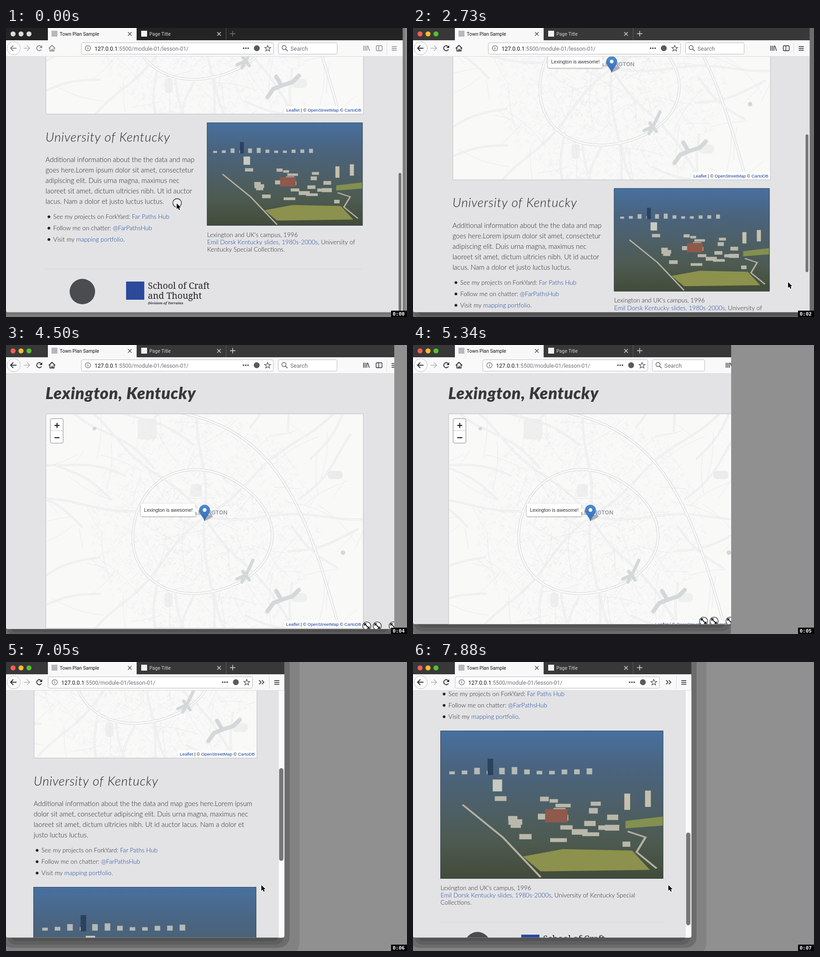
Write an HTML page with a canvas that moves like this. It is 881 by 636 pixels and loops after 8 s.

```html
<!DOCTYPE html>
<html lang="en">
<head>
<meta charset="utf-8">
<title>Responsive map page</title>
<style>
html, body { margin: 0; width: 100%; height: 100%; overflow: hidden; background: #909090; }
canvas { display: block; width: 881px; height: 636px; }
</style>
</head>
<body>
<canvas id="stage" width="881" height="636"></canvas>
<script>
const LOOP = 8000, STEPS = 56, TAU = 2 * Math.PI;
const INK = '#232326', LINK = '#17429b';
const SANS = '"Liberation Sans", Arial, sans-serif', UI = 'Roboto, sans-serif', SERIF = '"Noto Serif", serif';
const stage = document.getElementById('stage').getContext('2d');
let c = stage;

// Key points: step, then one or more values
const SCROLL = [[17, 434], [23, 0], [42, 0], [44, 121], [49, 412], [55, 756]];
const MOUSE = [[3, 375, 386], [8, 250, 468], [13, 822, 592], [17, 822, 592], [20, 825, 543],
  [25, 825, 543], [28, 866, 621], [40, 611, 606], [42, 561, 491]];

const ramp = (k, a, b) => Math.max(0, Math.min(1, (k - a) / (b - a)));

function at(keys, k) {
  let i = 0;
  while (i < keys.length - 2 && keys[i + 1][0] <= k) i++;
  const a = keys[i], b = keys[i + 1], u = ramp(k, a[0], b[0]);
  return a.slice(1).map((v, j) => v + (b[j + 1] - v) * u);
}

function random(seed) {
  return () => (seed = (seed * 16807) % 2147483647) / 2147483647;
}

function rect(x, y, w, h, fill) {
  c.fillStyle = fill;
  c.fillRect(x, y, w, h);
}

function paint(fill, line, width = 1) {
  if (fill) { c.fillStyle = fill; c.fill(); }
  if (line) { c.strokeStyle = line; c.lineWidth = width; c.stroke(); }
}

function box(x, y, w, h, r, fill, line, width) {
  c.beginPath();
  c.roundRect(x, y, w, h, r);
  paint(fill, line, width);
}

function disc(x, y, r, fill, line, width) {
  box(x - r, y - r, 2 * r, 2 * r, r, fill, line, width);
}

function trace(p) {
  c.beginPath();
  for (let i = 0; i < p.length; i += 2) c.lineTo(p[i], p[i + 1]);
}

function poly(p, fill) {
  trace(p);
  paint(fill);
}

function lines(color, width, ...paths) {
  for (const p of paths) {
    trace(p);
    paint(null, color, width);
  }
}

function text(s, x, y, font, color = INK, spacing = 0) {
  c.font = font;
  c.fillStyle = color;
  c.letterSpacing = spacing + 'px';
  c.fillText(s, x, y);
  const end = x + c.measureText(s).width;
  c.letterSpacing = '0px';
  return end;
}

// Alternating plain and linked pieces on one line
function mixed(parts, x, y, font) {
  parts.forEach((s, i) => { if (s) x = text(s, x, y, font, i % 2 ? LINK : INK); });
}

// A line that winds gently from a point in one direction
function winding(x, y, angle, length, bend) {
  const p = [];
  for (let d = 0; d <= length; d += length / 24) {
    const side = bend * Math.sin(d / 42);
    p.push(x + d * Math.cos(angle) - side * Math.sin(angle), y + d * Math.sin(angle) + side * Math.cos(angle));
  }
  return p;
}

function makeMap() {
  const canvas = document.createElement('canvas');
  canvas.width = 881;
  canvas.height = 636;
  c = canvas.getContext('2d');
  c.lineJoin = c.lineCap = 'round';
  rect(0, 0, 881, 636, '#f9f9f8');
  const rnd = random(77), cx = 437, cy = 378;

  box(290, 162, 42, 46, 8, '#eeefee');
  box(407, 306, 24, 28, 6, '#eeefee');
  box(349, 545, 18, 32, 6, '#eeefee');
  box(707, 277, 33, 18, 8, '#eaebea');
  box(628, 546, 34, 20, 9, '#edf0ec');

  // Fine street grid, denser near the centre
  for (let i = 0; i < 2600; i++) {
    const a = rnd() * TAU, d = 250 * Math.sqrt(rnd());
    const x = cx + d * Math.cos(a), y = 400 + d * Math.sin(a);
    const turn = 0.75 + Math.sin(x / 70) * 0.25 + (rnd() < 0.5 ? TAU / 4 : 0), n = 3 + rnd() * 9;
    lines(d < 120 ? '#e3e5e5' : '#e9ebeb', 0.8, [x, y, x + n * Math.cos(turn), y + n * Math.sin(turn)]);
  }
  for (let i = 0; i < 90; i++) {
    lines('#e8eaea', 1, winding(60 + rnd() * 760, 150 + rnd() * 480, rnd() * TAU, 40 + rnd() * 80, 8));
  }

  const roads = [];
  for (let i = 0; i < 8; i++) roads.push(winding(cx, cy, i * TAU / 8 + 0.1 * Math.sin(i * 2), 520, 6));
  for (let i = 0; i < 22; i++) {
    const a = i * TAU / 22, d = 130 + rnd() * 150;
    roads.push(winding(cx + d * Math.cos(a), 400 + d * Math.sin(a), a + rnd() * 2 - 1, 110 + rnd() * 170, 9));
  }
  const ring = [], bypass = [];
  for (let a = 0; a < 6.4; a += 0.1) {
    const r = 1 + 0.035 * Math.sin(3 * a + 1);
    ring.push(428 + 153 * r * Math.cos(a), 413 + 136 * r * Math.sin(a));
  }
  for (let t = 0; t <= 1.001; t += 0.05) {
    const s = 1 - t, mix = (p, q, r, v) => s * s * s * p + 3 * s * s * t * q + 3 * s * t * t * r + t * t * t * v;
    bypass.push(mix(380, 600, 660, 735), mix(148, 190, 360, 632));
  }
  lines('#d9dcdd', 3.4, ...roads);
  lines('#d3d6d8', 5.4, ring, bypass);
  lines('#fbfbfa', 1.9, ...roads);
  lines('#fbfbfa', 3.4, ring, bypass);

  const water = '#d4d8da';
  lines(water, 7, [508, 515, 528, 506, 543, 474], [521, 498, 535, 517], [526, 508, 519, 522]);
  lines(water, 9, [575, 586, 588, 568, 608, 560, 630, 553, 644, 539], [606, 561, 594, 541]);
  disc(195, 184, 4, water);
  disc(741, 457, 5, water);
  return canvas;
}

function drawMarker(x, y) {
  c.save();
  c.translate(x, y);
  poly([0, 0, 6, -12, 16, -15, 18, -9, 8, -3], 'rgba(0,0,0,.28)');
  const blue = c.createLinearGradient(0, -35, 0, 0);
  blue.addColorStop(0, '#4b8fd0');
  blue.addColorStop(1, '#3569b9');
  c.beginPath();
  c.moveTo(0, 0);
  c.bezierCurveTo(-3, -10, -11.5, -15, -11.5, -23.5);
  c.arc(0, -23.5, 11.5, Math.PI, 0);
  c.bezierCurveTo(11.5, -15, 3, -10, 0, 0);
  paint(blue, '#3c70b2');
  disc(0, -24, 4, '#fff');
  c.shadowColor = 'rgba(0,0,0,.4)';
  c.shadowBlur = 3;
  c.shadowOffsetY = 1;
  box(-140, -38, 120, 28, 3, '#fff');
  c.shadowColor = 'transparent';
  poly([-20, -29, -14, -24, -20, -19], '#fff');
  text('Lexington is awesome!', -133, -20, '10.5px ' + SANS, '#333');
  c.restore();
}

function drawMap(w, y) {
  const x = w * 0.1, cx = w / 2 + 1;
  c.save();
  c.beginPath();
  c.rect(x, y + 151, w * 0.8 + 2, 473);
  c.clip();
  c.drawImage(map, cx - 437, y);
  text('LEXINGTON', cx - 21, y + 373, '600 12px Inter, sans-serif', '#8d98a5', 0.2);
  drawMarker(cx, y + 387);

  const ax = x + w * 0.8 - 169;
  rect(ax - 4, y + 606, 176, 18, 'rgba(255,255,255,.7)');
  mixed(['', 'Leaflet', ' | © ', 'OpenStreetMap', ' © ', 'CartoDB'], ax + 1, y + 618, '9.7px ' + SANS);

  const z = x + 10.5;
  box(z, y + 162, 28, 54, 4, '#fff', 'rgba(0,0,0,.25)', 2);
  rect(z, y + 188, 28, 1, '#ccc');
  lines('#111', 2, [z + 9, y + 177, z + 20, y + 177], [z + 14.5, y + 171.5, z + 14.5, y + 182.5], [z + 9, y + 204, z + 20, y + 204]);
  c.restore();
  box(x + 0.5, y + 151.5, w * 0.8 + 1, 472, 0, null, '#cbcccf', 1.5);
}

function drawPhoto(x, y, w, h) {
  c.save();
  c.translate(x, y);
  const g = c.createLinearGradient(0, 0, 0, h);
  ['#47709f', '#4a6480', '#4d6069', '#4d5a50', '#414b39'].forEach((color, i) => g.addColorStop(i / 4, color));
  rect(0, 0, w, h, g);
  c.scale(w, h);
  poly([0.37, 0.85, 0.55, 0.8, 0.86, 0.81, 0.94, 0.94, 0.45, 0.95], '#8c914d');
  poly([0.83, 0.61, 1, 0.58, 1, 0.64, 0.83, 0.66], '#83904f');
  lines('#b5b0a0', 0.01, [0.1, 0.5, 0.28, 0.72, 0.45, 0.99], [0.84, 0.68, 0.92, 0.72, 0.88, 0.82, 0.97, 0.93]);

  // Skyline in the distance, low buildings nearer
  const rnd = random(9);
  for (let i = 0; i < 12; i++) {
    const s = 0.02 + 0.03 * rnd();
    rect(0.04 + i * 0.056, 0.295 - s, 0.025, s, '#b4b9b5');
  }
  for (let i = 0; i < 22; i++) {
    rect(0.22 + 0.6 * rnd(), 0.42 + 0.33 * rnd(), 0.03 + 0.05 * rnd(), 0.02 + 0.02 * rnd(), '#b9b8aa');
  }
  rect(0.212, 0.19, 0.025, 0.11, '#29435f');
  rect(0.235, 0.33, 0.042, 0.08, '#c9cac2');
  rect(0.47, 0.53, 0.1, 0.09, '#8f594b');
  rect(0.825, 0.425, 0.026, 0.11, '#c5c1ad');
  rect(0.918, 0.405, 0.026, 0.11, '#c5c1ad');
  c.restore();
  box(x + 0.5, y + 0.5, w - 1, h - 1, 0, null, '#384652');
}

const COPY = {
  wide: ['Additional information about the the data and map', 'goes here.Lorem ipsum dolor sit amet, consectetur',
    'adipiscing elit. Duis urna magna, maximus nec', 'laoreet sit amet, dictum ultricies nibh. Ut id auctor', 'lacus. Nam a dolor et justo luctus luctus.'],
  narrow: ['Additional information about the the data and map goes here.Lorem ipsum', 'dolor sit amet, consectetur adipiscing elit. Duis urna magna, maximus nec',
    'laoreet sit amet, dictum ultricies nibh. Ut id auctor lacus. Nam a dolor et', 'justo luctus luctus.']
};
const ITEMS = [['See my projects on ForkYard: ', 'Far Paths Hub'], ['Follow me on chatter: ', '@FarPathsHub'], ['Visit my ', 'mapping portfolio', '.']];

function drawPage(w, scroll, narrow) {
  const x = w * 0.1 - 0.3, y = -scroll, small = '300 13.6px Lato, sans-serif';
  text('Lexington, Kentucky', x, y + 119, 'italic 900 36px Lato, sans-serif', '#37383a', 0.8);
  drawMap(w, y);
  text('University of Kentucky', x, y + 683.5, 'italic 300 28px Lato, sans-serif', INK, 0.85);
  const copy = narrow ? COPY.narrow : COPY.wide;
  copy.forEach((s, i) => text(s, x, y + 729 + 23 * i, '300 15px Lato, sans-serif'));
  const top = y + 739 + 23 * copy.length;
  ITEMS.forEach((item, i) => {
    disc(x + 7.5, top + 25 * i - 4.5, 3, INK);
    mixed(item, x + 17, top + 25 * i, small);
  });

  const px = narrow ? 60 : 441.5, py = y + (narrow ? 907 : 642);
  const pw = narrow ? 490 : 342, ph = Math.round(pw * 0.665);
  drawPhoto(px, py, pw, ph);
  const cy = py + ph + 24.5;
  text("Lexington and UK's campus, 1996", px + 0.5, cy, small);
  mixed(['', 'Emil Dorsk Kentucky slides, 1980s-2000s', ', University of' + (narrow ? ' Kentucky Special' : '')], px + 0.5, cy + 16.4, small);
  text(narrow ? 'Collections.' : 'Kentucky Special Collections.', px + 0.5, cy + 32.8, small);

  const foot = y + (narrow ? 1328 : 964);
  rect(x, foot, w * 0.8 - 1, 1, '#d3d4d7');
  disc(x + 81, foot + 50, 28, '#4b4c4f');
  rect(x + 177, foot + 28, 40, 40, '#2b4a9b');
  text('School of Craft', x + 225, foot + 44, '19.5px ' + SERIF);
  text('and Thought', x + 225, foot + 66, '19.5px ' + SERIF);
  text('Division of Terrains', x + 225, foot + 78, 'italic bold 7.6px ' + SERIF);
}

function drawTabs(w, active) {
  rect(0, 0, w, 27, active ? '#383839' : '#232324');
  ['#f95e57', '#fabd2f', '#54c22b'].forEach((color, i) => disc(15.5 + 17.5 * i, 13, 5.5, active ? color : '#dcdcdc'));
  rect(92, 0, 195, 27, '#f8f8f9');
  rect(100, 6, 13, 13, '#b8b8ba');
  rect(297, 6, 13, 13, '#f2f2f2');
  text('Town Plan Sample', 118, 17, '10.5px ' + UI, '#111');
  text('Page Title', 315, 17, '10.5px ' + UI, '#d4d4d6');
  const cross = (x, color) => lines(color, 1.3, [x - 4, 9, x + 4, 17], [x + 4, 9, x - 4, 17]);
  cross(272, '#444');
  cross(468, '#ddd');
  rect(483, 0, 1, 27, '#5c5c5e');
  lines(active ? '#e0e0e0' : '#77777a', 1.4, [492, 12.5, 504, 12.5], [498, 6.5, 498, 18.5]);
}

// Arrow head of half-height s; dir is -1 for left, 1 for right
const chevron = (x, s, dir) => [x - dir * s, 44.5 - s, x, 44.5, x - dir * s, 44.5 + s];

function drawAddress(l, r) {
  box(l + 0.5, 32.5, r - l - 1, 25, 3, '#fff', '#b9b9bd');
  disc(l + 15, 44.5, 5.8, null, '#55555a', 1.1);
  rect(l + 14.4, 43.5, 1.3, 4, '#55555a');
  rect(l + 14.4, 41, 1.3, 1.4, '#55555a');
  const end = text('127.0.0.1', l + 29.5, 49.5, '12.2px ' + UI, '#111');
  text(':5500/module-01/lesson-01/', end, 49.5, '12.2px ' + UI, '#737378');
  for (let i = 0; i < 3; i++) disc(r - 66 + 5 * i, 44.5, 1.7, '#48484c');
  disc(r - 37, 44.5, 6.5, '#5a5a5e');
  const star = [];
  for (let i = 0; i <= 10; i++) {
    const a = i * TAU / 10 - TAU / 4, n = i % 2 ? 3 : 7;
    star.push(r - 13 + n * Math.cos(a), 45 + n * Math.sin(a));
  }
  lines('#4c4c50', 1.2, star);
}

function drawToolbar(w, full, active, narrow) {
  rect(0, 27, full, 36, '#f9f9fa');
  rect(0, 62, full, 1, '#dcdcde');
  const ink = active ? '#29292c' : '#88888b', d = 871 - w;
  disc(17, 44.5, 14.5, '#fcfcfc', '#bcbcbf');
  lines(ink, 1.8, [23, 44.5, 10, 44.5], chevron(10, 6, -1));
  lines('#b4b4b7', 1.6, [39, 44.5, 52, 44.5], chevron(52, 6, 1));
  c.beginPath();
  c.arc(73, 44.5, 5.5, 0.5, 5.6);
  paint(null, ink, 1.8);
  poly([79.5, 38, 79.5, 44, 73.5, 44], ink);

  if (narrow) {
    drawAddress(92, 542);
    lines(ink, 1.6, chevron(560.5, 4.5, 1), chevron(566.5, 4.5, 1));
  } else {
    lines(ink, 1.8, [94, 45, 101, 38, 108, 45], [96.5, 44, 96.5, 50.5, 105.5, 50.5, 105.5, 44]);
    rect(100, 46, 2.5, 4, ink);
    drawAddress(165 - d * 0.13, 588 - d * 0.77);
    const s = 598 - d * 0.78, e = 728 - d * 0.93, q = 792 - d * 1.05;
    box(s + 0.5, 32.5, e - s - 1, 25, 3, '#fff', '#b9b9bd');
    disc(s + 13, 43, 4.5, null, '#55555a', 1.4);
    lines('#55555a', 1.6, [s + 16, 46, s + 21, 51]);
    text('Search', s + 27, 49.5, '12.4px ' + UI, '#6f6f74');
    for (let x = q - 6; x < q + 3; x += 3.5) lines(ink, 1.5, [x, 39, x, 50]);
    lines(ink, 1.5, [q + 3, 39, q + 6.5, 50]);
    box(q + 21.5, 39, 13, 11, 2, null, ink, 1.4);
    rect(q + 26.5, 39, 1.3, 11, ink);
  }
  const m = narrow ? 595 : 853 - d * 1.05;
  rect(m - 17, 31, 1, 28, '#d9d9dc');
  for (let y = 40; y < 50; y += 4) rect(m - 5.5, y, 11, 1.6, ink);
}

function drawShadow(w, h, active, dragging) {
  rect(0, 0, 881, 636, '#909090');
  c.save();
  c.beginPath();
  c.rect(0, 0, dragging ? w : 881, 636);
  c.clip();
  if (active) {
    box(-30, -30, w + 64, h + 74, 34, '#828282');
    box(-10, -30, w + 22, h + 53, 24, '#6c6c6c');
    box(2, -30, w - 2, h + 46, 20, '#5f5f5f');
    box(10, -30, w - 22, h + 38, 12, '#535353');
  } else {
    box(-20, -20, w + 26, h + 34, 14, '#7e7e7e');
    box(-6, -20, w + 4, h + 26, 10, '#747474');
  }
  c.restore();
}

function drawResize(x, y) {
  disc(x, y, 9, 'rgba(255,255,255,.75)', '#222', 1.3);
  lines('#111', 2, [x - 4, y - 4, x + 4, y + 4]);
  for (const s of [-1, 1]) poly([x + 6 * s, y + 6 * s, x, y + 6 * s, x + 6 * s, y], '#111');
}

function drawArrow(x, y) {
  c.save();
  c.translate(x, y);
  const p = [0, 0, 0, 12.5, 3, 9.8, 5, 14.5, 7.3, 13.5, 5.3, 9, 9.2, 9, 0, 0];
  lines('#fff', 2.2, p);
  poly(p, '#000');
  c.restore();
}

function draw(k) {
  c = stage;
  const drag = ramp(k, 30, 40) ** 1.15;
  const w = 871 - 260 * drag, h = 625 - 19 * drag ** 1.3;
  const layout = 871 - 260 * drag ** 2.5;  // content trails the window edge
  const [scroll] = at(SCROLL, k), [mx, my] = at(MOUSE, k);
  const active = k >= 2, narrow = layout < 690, dragging = k > 30 && k < 40;
  drawShadow(w, h, active, dragging);

  c.save();
  c.beginPath();
  c.roundRect(0, 0, w + 0.5, h + 0.5, [0, 0, 4, 4]);
  c.clip();
  rect(0, 62, w + 1, h, '#e3e3e5');
  drawPage(layout, scroll, narrow);
  if (k >= 40) {
    rect(598, 63, 14, h, '#fafafa');
    rect(598, 63, 1, h, '#dcdcde');
    box(600, 64 + scroll * 0.412, 9.5, 204, 4.7, '#77777a');
  } else if (k < 4 || (k >= 17 && k < 28)) {
    box(w - 8.5, 65 + scroll * 0.585, 6, 303, 3, '#757578');
  }
  drawToolbar(layout, w + 1, active, narrow);
  drawTabs(w + 1, active);
  if (dragging) [60, 37, 2].forEach(o => drawResize(w - o, h - 6));
  c.restore();

  if (k < 2) disc(376, 385, 9.5, 'rgba(255,255,255,.35)', '#222', 1.3);
  if (k >= 28 && k <= 30) drawResize(mx, my);
  else if (!dragging) drawArrow(mx, my);

  rect(846, 622, 35, 14, '#000');
  const sec = Math.max(0, Math.floor((k - 1) / 7));
  text('0:0' + sec, 849.5, 633, 'bold 11px "DejaVu Sans Mono", monospace', '#fff');
}

const map = makeMap();
let last = -1;
function tick(now) {
  const k = Math.floor((now % LOOP) / LOOP * STEPS);
  if (k !== last) draw(last = k);
  requestAnimationFrame(tick);
}
tick(performance.now());
</script>
</body>
</html>
```
